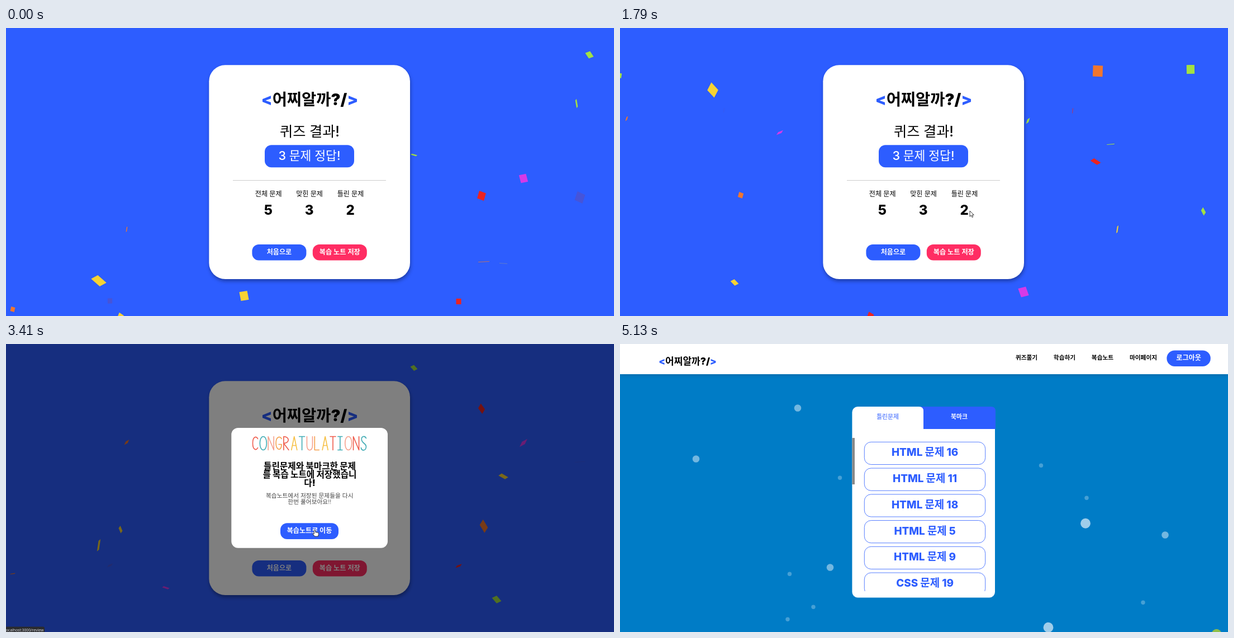
An HTML page that plays this animation: 1088 px wide and 515 px high, repeating every 5.21 s.

```html
<!DOCTYPE html>
<html lang="ko">
<head>
<meta charset="utf-8">
<title>퀴즈 결과</title>
<style>
  html, body { margin: 0; width: 100%; height: 100%; overflow: hidden; background: #2d5dff; }
  svg { display: block; width: 100vw; height: 100vh; }
  text { font-family: Inter, "Noto Sans CJK KR", "Noto Sans CJK", sans-serif; text-anchor: middle; white-space: pre; }
  .status { font-family: "Noto Sans", sans-serif; text-anchor: start; }
  .card { filter: drop-shadow(1px 4px 3px rgba(0, 0, 0, .32)); }
  .header { filter: drop-shadow(0 2px 3px rgba(0, 0, 0, .15)); }
</style>
</head>
<body>
<svg id="stage" viewBox="0 0 1088 515" preserveAspectRatio="none"></svg>
<script>
const LOOP = 5210, FRAME = LOOP / 78;
const OPEN = 2090, CLOSE = 3560, PAGE_AT = 3870, LOGIN_AT = 3935;
const BLUE = '#2d5dff', PINK = '#ff2d63', PINK_HOVER = '#ff1750';
const stage = document.getElementById('stage');

// ---------- helpers ----------
function add(parent, tag, attrs, content) {
  const el = document.createElementNS('http://www.w3.org/2000/svg', tag);
  for (const k in attrs) el.setAttribute(k, attrs[k]);
  if (content) el.textContent = content;
  parent.appendChild(el);
  return el;
}
const group = (parent, attrs) => add(parent, 'g', attrs || {});
const box = (parent, x, y, width, height, rx, fill, more) =>
  add(parent, 'rect', { x, y, width, height, rx, fill, ...more });
const label = (parent, x, cy, size, weight, fill, str) =>
  add(parent, 'text', { x, y: cy + size * .37, 'font-size': size, 'font-weight': weight, fill }, str);
const show = (el, on) => el.setAttribute('display', on ? 'inline' : 'none');
const clamp = v => Math.max(0, Math.min(1, v));
const mix = (a, b, p) => a + (b - a) * p;
const smooth = p => p * p * (3 - 2 * p);

function wordmark(x, y, size, parent) {
  const el = add(parent, 'text', { x, y, 'font-size': size, 'font-weight': 900 });
  [['<', BLUE], ['어찌알까?/', '#000'], ['>', BLUE]].forEach(([s, fill]) => add(el, 'tspan', { fill }, s));
}
function button(parent, x, y, w, h, r, size, str, fill = BLUE) {
  const el = box(parent, x, y, w, h, r, fill);
  label(parent, x + w / 2, y + h / 2 - 1.2, size, 700, '#fff', str);
  return el;
}

// ---------- result page ----------
const result = group(stage);
box(result, 0, 0, 1088, 515, 0, BLUE);

const LIME = '#a3e142', VIOLET = '#4654d9', MAGENTA = '#d53ae8', RED = '#ec2320', ORANGE = '#f1762e', YELLOW = '#f6d233';
// colour, x, y at start; each list runs from the largest piece to the smallest
const SLOW = [
  [YELLOW, 166, 452], [ORANGE, 855, 418], [VIOLET, 1027, 303], [YELLOW, 426, 479], [MAGENTA, 926, 269], [LIME, 878, 549],
  [LIME, 1044, 48], [MAGENTA, 286, 528], [RED, 810, 489], [VIOLET, 186, 488], [ORANGE, 12, 503]
];
const FAST = [
  [MAGENTA, 722, 533], [LIME, 1021, 135], [RED, 851, 300], [YELLOW, 890, 421], [RED, 565, 292], [RED, 448, 576],
  [YELLOW, 205, 516], [LIME, 715, 351], [LIME, 730, 227], [ORANGE, 216, 360], [ORANGE, 631, 292], [LIME, -1, 146]
];
const FALL = 621;
function scatter(list, duration, largest, shrink) {
  return list.map(([color, x, y], i) => {
    const size = largest * shrink ** i, w = size * .94, h = size * 1.06;
    return { x, y, speed: FALL / duration, el: box(result, -w / 2, -h / 2, w, h, 0, color) };
  });
}
const confetti = [...scatter(SLOW, 4000, 20.5, .91), ...scatter(FAST, 2000, 16, .94)];

// each piece falls at a steady rate and turns about the (1,1,1) axis, three turns per fall
function drawConfetti(t) {
  for (const p of confetti) {
    const y = (p.y + 50 + t * p.speed) % FALL - 50;
    const a = (y - 282) / (FALL / 3) * 2 * Math.PI;
    const k = (1 - Math.cos(a)) / 3, s = Math.sin(a) / Math.sqrt(3), d = 1 - 2 * k;
    p.el.setAttribute('transform', `matrix(${[d, k + s, k - s, d, p.x, y].map(v => v.toFixed(4))})`);
  }
}

box(result, 363.3, 66.2, 359.7, 382.8, 29, '#fff', { class: 'card' });
wordmark(543.5, 138, 28.5, result);
label(result, 543.5, 185, 25.2, 500, '#000', '퀴즈 결과!');
box(result, 463, 209.3, 160, 40, 12, BLUE);
label(result, 543, 228, 21.6, 500, '#fff', '3 문제 정답!');
box(result, 406, 272, 274, 1, 0, '#ccc');
[['전체', 5], ['맞힌', 3], ['틀린', 2]].forEach(([word, n], i) => {
  const x = 469.7 + i * 73.4;
  label(result, x, 297, 12.1, 500, '#000', word + ' 문제');
  label(result, x - .4, 325.5, 24, 800, '#000', String(n));
});
button(result, 440.4, 387, 97, 28.6, 12, 12, '처음으로');
const save = button(result, 548.8, 387, 97, 28.6, 12, 12.2, '복습 노트 저장', PINK);

// ---------- dialog ----------
const dim = box(result, 0, 0, 1088, 515, 0, '#000');
const dialog = group(result);
box(dialog, 403.3, 150, 279.7, 214.8, 12, '#fff');

const GLYPHS = {
  C: 'M9 4C7-1 0-1 0 12S7 25 9 20', O: 'M5 0C-3 0-3 24 5 24S13 0 5 0',
  N: 'M0 24V0L10 24V0', G: 'M10 4C8-1 0-1 0 12S10 27 10 14H5',
  R: 'M0 24V0C11 0 11 12 0 12L9 24', A: 'M0 24L5 0L10 24M2 16H8',
  T: 'M0 0H10M5 0V24', U: 'M0 0V16C0 27 10 27 10 16V0',
  L: 'M0 0V24H8', I: 'M0 0H8M4 0V24M0 24H8', S: 'M9 3C7-2 0-1 1 6S10 12 9 19S1 26 0 20'
};
const INK = { red: '#ef5a4a', teal: '#3fabb4', salmon: '#f6a08c', orange: '#f5a04c', yellow: '#f6c045' };
const INK_ORDER = 'red teal salmon orange red yellow teal salmon orange yellow red teal salmon red teal'.split(' ');
const banner = group(dialog, { role: 'img', 'aria-label': 'CONGRATULATIONS', fill: 'none',
  'stroke-width': 1.6, 'stroke-linecap': 'round', 'stroke-linejoin': 'round' });
[...'CONGRATULATIONS'].forEach((ch, i) => add(banner, 'path',
  { d: GLYPHS[ch], stroke: INK[INK_ORDER[i]], transform: `translate(${441.5 + 13.85 * i} 165.5)` }));

['틀린문제와 북마크한 문제', '를 복습 노트에 저장했습니', '다!'].forEach((s, i) =>
  label(dialog, 543.5, 218 + 15 * i, 15.7, 900, '#000', s));
['복습노트에서 저장된 문제들을 다시', '한번 풀어보아요!!'].forEach((s, i) =>
  label(dialog, 543.3, 271.5 + 10.5 * i, 10.7, 300, '#444', s));
button(dialog, 491, 320.2, 104, 28.8, 12, 12.1, '복습노트로 이동');

function drawDialog(t) {
  const age = (t - OPEN) / 300, out = clamp((t - CLOSE) / 150);
  // grows from 70% with a small damped overshoot
  const scale = 1 - .3 * Math.exp(-4 * age) * Math.cos(7 * age) - out / 2;
  show(dialog, age >= 0 && out < 1);
  dialog.setAttribute('opacity', 1 - out);
  dialog.setAttribute('transform', `translate(543.3 257.5) scale(${age > 1.5 && !out ? 1 : scale}) translate(-543.3 -257.5)`);
  dim.setAttribute('opacity', .5 * clamp((t - OPEN) / 100) * clamp(1 - (t - CLOSE) / 100));
}

// ---------- review page ----------
const review = group(stage);
box(review, 0, 0, 1088, 515, 0, '#007cc6');

// x, y (and colour) of the bubbles just after the page opens, by layer from far to near
const LAYERS = [
  [[393.5, 272], [753.5, 250], [835, 308], [936, 495], [303.5, 444], [346, 503], [300, 525]],
  [[318, 180], [136, 271], [975.5, 407], [376, 465], [767, 83]],
  [[833, 419], [766.5, 68], [766.5, 605], [1067.5, 617, '#8fbf4b']]
];
// nearer bubbles are larger, clearer and faster
const bubbles = LAYERS.flatMap((points, i) => points.map(([cx, y, color]) => {
  const near = i + 1;
  const attrs = { cx, r: 1.1 + 2.6 * near, fill: color || '#fff', 'fill-opacity': color ? 1 : .1 + .175 * near };
  return { y, speed: near * .0289, el: add(review, 'circle', attrs) };
}));

box(review, 0, 0, 1088, 54, 0, '#fff', { class: 'header' });
wordmark(121, 37, 17, review);
[['퀴즈풀기', 727.5], ['학습하기', 795.5], ['복습노트', 863.5], ['마이페이지', 936.5]].forEach(([s, x]) =>
  label(review, x, 24.5, 10.7, 700, '#000', s));
const logout = group(review);
button(logout, 978.4, 11.4, 78.4, 28.6, 14.3, 12.1, '로그아웃');

box(review, 415.4, 112, 255.6, 341.4, 10, '#fff');
add(review, 'path', { d: 'M535 112H664Q672 112 672 120V152H543V120Q543 112 535 112Z', fill: BLUE });
label(review, 479, 130.5, 10.8, 500, BLUE, '틀린문제');
label(review, 607, 130.5, 10.8, 700, '#fff', '북마크');
box(review, 415.4, 168, 4.6, 83, 0, '#888');

const clip = add(add(stage, 'defs', {}), 'clipPath', { id: 'list' });
box(clip, 420, 160, 251, 282, 0, '#000');
const list = group(review, { 'clip-path': 'url(#list)' });
const items = ['HTML 문제 16', 'HTML 문제 11', 'HTML 문제 18', 'HTML 문제 5', 'HTML 문제 9', 'CSS 문제 19']
  .map((s, i) => {
    const y = 175.3 + 46.75 * i;
    return { y, rect: box(list, 437.3, y, 216.4, 40.2, 12, '#fff', { stroke: BLUE, 'stroke-width': .8 }),
             text: label(list, 545.6, y + 18, 18.9, 800, BLUE, s) };
  });

// ---------- browser status and pointer ----------
const status = group(stage);
add(status, 'path', { d: 'M0 505.5H66Q69 505.5 69 508.5V515H0Z', fill: '#2a2b2e' });
add(status, 'text', { x: -2, y: 513.5, 'font-size': 6.8, fill: '#d8dade', class: 'status' }, 'localhost:3000/review');

const outline = { fill: '#fff', stroke: '#222', 'stroke-width': .9, 'stroke-linejoin': 'round' };
const pointer = group(stage);
const arrow = add(pointer, 'path', { d: 'M0 0V10.2L2.4 8L4.1 11.6L5.8 10.8L4.2 7.3H7.3Z', ...outline });
const hand = add(pointer, 'path', { ...outline,
  d: 'M-1.2 1Q0-.8 1.2 1V4.6L5 5.2Q7 5.6 7 7.4L6 12H0L-3.6 7.6Q-3.6 6-1.2 7.4Z' });

// arrival time and place; the pointer rests, then makes a short eased move to the next stop
const STOPS = [[600, 660, 515], [930, 589, 394], [1790, 626, 327], [3340, 552.5, 332], [4000, 605, 336.5], [4400, 1095, 240]];
const MOVE = 180;

function drawPointer(t) {
  const next = STOPS.findIndex(s => t < s[0]);
  show(pointer, next > 0);
  const [, x0, y0] = STOPS[Math.max(0, next - 1)], [at, x1, y1] = STOPS[Math.max(0, next)];
  const p = smooth(clamp(1 - (at - t) / MOVE));
  const x = mix(x0, x1, p), y = mix(y0, y1, p);
  const inside = (l, top, r, b) => next > 0 && x > l && x < r && y > top && y < b;

  const onSave = t < OPEN && inside(549, 387, 646, 416);
  const onLink = t >= OPEN && t < CLOSE && inside(491, 320, 595, 349);
  let onItem = false;
  for (const it of items) {
    const over = t >= PAGE_AT && inside(437, it.y, 654, it.y + 40);
    onItem = onItem || over;
    it.rect.setAttribute('fill', over ? BLUE : '#fff');
    it.text.setAttribute('fill', over ? '#fff' : BLUE);
  }
  save.setAttribute('fill', onSave ? PINK_HOVER : PINK);
  pointer.setAttribute('transform', `translate(${x} ${y})`);
  const link = onSave || onLink || onItem;
  show(arrow, !link);
  show(hand, link);
}

// ---------- timing ----------
function draw(t) {
  const onReview = t >= PAGE_AT;
  show(result, !onReview);
  show(review, onReview);
  if (onReview) {
    for (const b of bubbles) b.el.setAttribute('cy', b.y - (t - 4010) * b.speed);
    show(logout, t >= LOGIN_AT);
  } else {
    drawConfetti(t);
    drawDialog(t);
  }
  drawPointer(t);
  show(status, t >= 3230 && t < 4300);
}

// the picture advances in even steps, each shown slightly early
const LEAD = 15;
const begin = performance.now();
function tick() {
  const now = (performance.now() - begin + LEAD) % LOOP;
  draw(Math.floor(now / FRAME) * FRAME);
  requestAnimationFrame(tick);
}
tick();
</script>
</body>
</html>
```
